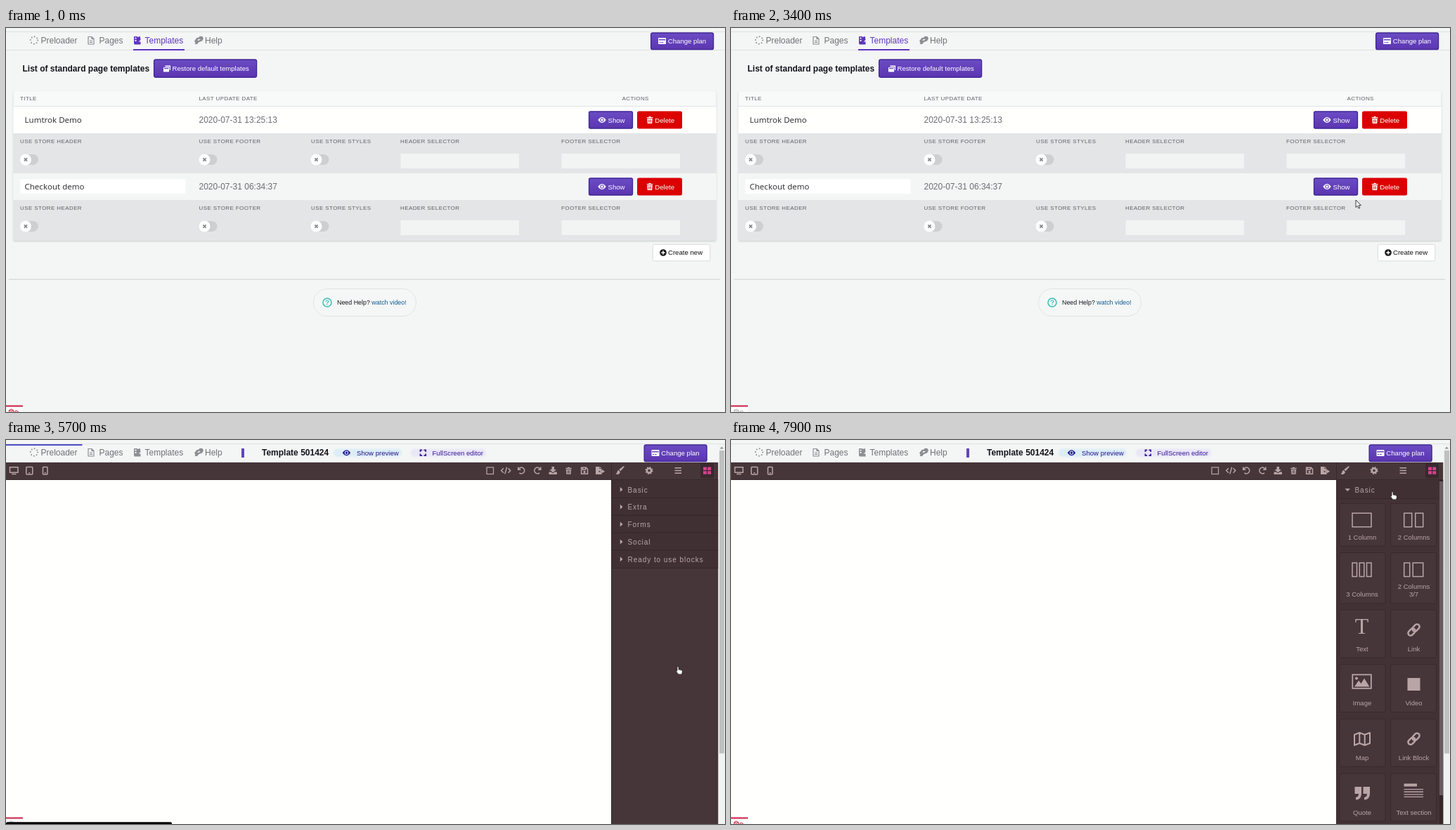
Write an HTML page that moves like this. It is 1023 by 547 pixels and loops after 8000 ms.

```html
<!DOCTYPE html>
<html lang="en">
<head>
<meta charset="utf-8">
<title>Template editor</title>
<style>
html, body { margin: 0; width: 100%; height: 100%; overflow: hidden; background: #f4f6f5; }
svg { display: block; width: 1023px; height: 547px; font: 12px "Liberation Sans", Arial, sans-serif; }
.nav { fill: #6f7276; }
.bold { font-weight: bold; fill: #15131c; }
.btn { font-size: 9.6px; }
.caps { font-size: 8px; letter-spacing: .4px; fill: #5f6367; }
.name { font: 11.5px "Noto Sans", sans-serif; fill: #35363a; }
.date { fill: #6b6e73; }
.help { font-size: 8.9px; fill: #16161c; }
.cat { font-size: 10px; letter-spacing: .95px; fill: #b9a5a6; }
.blk { font-size: 9.5px; fill: #b9a5a6; text-anchor: middle; }
.line { fill: none; stroke: currentColor; }
.ink { color: #b9a5a6; fill: currentColor; }
.cell { fill: #463539; stroke: #38292d; }
.btnbox { fill: url(#violet); stroke: #3f2596; stroke-width: 1.3; }

.list, .editor, .open, .thumb, .hover, .focus, .cursor, .hand, .arrow, .status, .load, .badge, .plan {
  animation: 8s step-end infinite;
}
.list { animation-name: list; }
.editor { animation-name: editor; }
.open { animation-name: open; }
.thumb { animation-name: thumb; }
.h1 { animation-name: hoverDelete; }
.h2 { animation-name: hoverShow; }
.focus { animation-name: focus; }
.plan { animation-name: plan; }
.status { animation-name: status; }
.load { animation-name: load; }
.badge { animation-name: badge; }
.cursor { animation-name: move; }
.hand { animation-name: hand; }
.arrow { animation-name: arrow; }

@keyframes list { 0% { opacity: 1 } 71.25%, to { opacity: 0 } }
@keyframes editor { 0% { opacity: 0 } 71.25%, to { opacity: 1 } }
@keyframes open { 0% { opacity: 0 } 97.5%, to { opacity: 1 } }
@keyframes thumb { 0% { opacity: 0 } 98.75%, to { opacity: 1 } }
@keyframes hoverDelete { 0%, 22.5%, to { opacity: 0 } 21.25% { opacity: .14 } }
@keyframes hoverShow { 0%, 42.5%, to { opacity: 0 } 25% { opacity: .12 } }
@keyframes focus { 0% { stroke: #d9dbdb; stroke-width: 1px } 48.75%, to { stroke: #111; stroke-width: 1.8px } }
@keyframes plan { 0% { transform: none } 71.25%, to { transform: translateX(-9.5px) } }
@keyframes status {
  0%, 42.5%, 76.25%, to { width: 212px; opacity: 0 }
  25% { width: 212px; opacity: .5 }
  28.75% { width: 212px; opacity: 1 }
  47.5% { width: 229px; opacity: 1 }
  68.75% { width: 236px; opacity: 1 }
}
@keyframes load {
  0%, 75%, to { width: 0 }
  57.5% { width: 101px }
  60% { width: 102.6px; animation-timing-function: steps(4) }
  65% { width: 109px }
  70% { width: 110px }
  71.25% { width: 108.5px }
}
@keyframes badge { 0%, 83.75%, to { stroke: #c8304c } 25% { stroke: #b5b5b5 } }
@keyframes move {
  0% { transform: translate(912px, 26px); opacity: 0 }
  18.75% { transform: translate(912px, 26px); opacity: 1 }
  20% { transform: translate(916px, 72px) }
  21.25% { transform: translate(914px, 128px) }
  22.5% { transform: translate(903px, 178px) }
  23.75% { transform: translate(888px, 211px) }
  25% { transform: translate(878.5px, 227.5px) }
  41.25% { transform: translate(880px, 230px) }
  42.5% { transform: translate(889px, 245px) }
  43.75% { transform: translate(907px, 269px) }
  45% { transform: translate(930px, 295px) }
  46.25% { transform: translate(947px, 313px) }
  47.5%, 71.25% { transform: translate(956px, 322.5px) }
  75% { transform: translate(955px, 312px) }
  76.25% { transform: translate(953px, 270px) }
  77.5% { transform: translate(950px, 210px) }
  78.75% { transform: translate(949px, 155px) }
  80% { transform: translate(950px, 115px) }
  81.25% { transform: translate(953px, 92px) }
  83.75% { transform: translate(980.5px, 58.5px) }
  85% { transform: translate(982px, 54px) }
  86.25% { transform: translate(980px, 56px) }
  87.5% { transform: translate(973px, 60px) }
  88.75% { transform: translate(964px, 64px) }
  90% { transform: translate(955px, 68px) }
  91.25% { transform: translate(947px, 71px) }
  92.5% { transform: translate(943px, 73px) }
  93.75%, to { transform: translate(941px, 73.5px); opacity: 1 }
}
@keyframes hand { 0%, 22.5%, 42.5%, 75% { opacity: 0 } 21.25%, 25%, 46.25%, 78.75%, to { opacity: 1 } }
@keyframes arrow { 0%, 22.5%, 42.5%, 75% { opacity: 1 } 21.25%, 25%, 46.25%, 78.75%, to { opacity: 0 } }
</style>
</head>
<body>
<svg viewBox="0 0 1023 547">
<defs>
  <linearGradient id="violet" x2="0" y2="1"><stop stop-color="#6b4cc3"/><stop offset="1" stop-color="#5b35b1"/></linearGradient>
  <filter id="soft" x="-10%" y="-30%" width="120%" height="160%"><feGaussianBlur stdDeviation="1"/></filter>

  <path id="eye" fill-rule="evenodd" d="M-5.7 0Q0-8 5.7 0Q0 8-5.7 0zM-2.7 0a2.7 2.7 0 1 0 5.4 0a2.7 2.7 0 1 0-5.4 0zM-1.7 0a1.7 1.7 0 1 0 3.4 0a1.7 1.7 0 1 0-3.4 0z"/>
  <path id="trash" fill-rule="evenodd" d="M-4.3-4h2.6l.6-1h2.2l.6 1h2.6v1.3h-8.6zM-3.7-2h7.4l-.5 7h-6.4zM-1.9-.8v4.6h.7v-4.6zM-.35-.8v4.6h.7v-4.6zM1.2-.8v4.6h.7v-4.6z"/>
  <path id="card" fill-rule="evenodd" d="M-5.5-3.6q0-.9.9-.9h9.2q.9 0 .9.9v7.2q0 .9-.9.9h-9.2q-.9 0-.9-.9zM-4.7-2.5v1.6h9.4v-1.6zM-4 1.6v1h2v-1zM-1.2 1.6v1h3v-1z"/>
  <path id="windows" fill-rule="evenodd" d="M-2.5-4.5h7.5v6.5h-1.2v-4.8h-6.3zM-5-2h8v6.5h-8zM-4-1v1.3h6v-1.3z"/>
  <g id="spinner"><circle r="5.2" fill="none" stroke="currentColor" stroke-width="2" stroke-linecap="round" stroke-dasharray="0 4.084"/></g>
  <path id="page" class="line" stroke-width="1.2" d="M-4-5h5l3 3v7.5h-8zM1-5v3h3M-2 .5h4M-2 2.8h4"/>
  <path id="swatch" d="M-5-5.5h5v1l3.8-1l.7 5l-3 2.500h3v4h-8q-1.500 0-1.500-2zM-3.500-4v2h2v-2zM-3.500-.5v2h2v-2z" fill-rule="evenodd"/>
  <path id="hands" d="M-6.500 1l3.500-4.500l3-.5l1-1.800l4 .3l1.500 3l-2 3.500l-4.500 1.500l-2.500 3h-3.500l1-2zM-2.500 0l2-1.800l3 .4l-3 1.800z" fill-rule="evenodd"/>
  <path id="undo" class="line" stroke-width="1.5" d="M-4.300-1.500A4.400 4.400 0 1 1-3 3.400M-4.800-5v3.700h3.800"/>
  <g id="link" class="line" stroke-width="2.600" transform="rotate(-45)"><rect x="-10.500" y="-3.700" width="12" height="7.400" rx="3.700"/><rect x="-1.500" y="-3.700" width="12" height="7.400" rx="3.700"/></g>
  <path id="mark" d="M0 0h9.500v9.500q0 9-8 9v-3.500q4-.5 4-5h-5.500z"/>

  <g id="toggle">
    <rect x="1" y="-7.500" width="25" height="15" rx="7.500" fill="#cdcfd1"/>
    <circle cx="8" r="8" fill="#fdfefe"/>
    <path d="M5.900-2.100l4.200 4.200M10.100-2.100l-4.200 4.200" stroke="#85888b" stroke-width="1.700"/>
  </g>
  <g id="options">
    <rect x="10.500" y="150" width="1000" height="57" fill="#e3e5e6"/>
    <g class="caps">
      <text x="20" y="163.800">USE STORE HEADER</text>
      <text x="274.500" y="163.800">USE STORE FOOTER</text>
      <text x="434" y="163.800">USE STORE STYLES</text>
      <text x="561" y="163.800">HEADER SELECTOR</text>
      <text x="790" y="163.800">FOOTER SELECTOR</text>
    </g>
    <use href="#toggle" x="20" y="187.500"/><use href="#toggle" x="274.500" y="187.500"/><use href="#toggle" x="433.500" y="187.500"/>
    <path fill="#f2f4f4" d="M561.500 179h168.500v21h-168.500zM790.500 179h168.500v21h-168.500z"/>
  </g>
  <g id="actions" class="btn" fill="#fff">
    <rect class="btnbox" x="829.500" y="119" width="62" height="24" rx="2"/>
    <use href="#eye" x="848" y="131"/><text x="856.500" y="134.500">Show</text>
    <rect x="898" y="118.500" width="64" height="25" rx="2.500" fill="#dc0000"/>
    <use href="#trash" x="916" y="131"/><text x="923.300" y="134.500">Delete</text>
  </g>
</defs>

<rect width="1023" height="547" fill="#f4f6f5"/>
<path stroke="#dfe1e1" d="M0 5.500h1023M0 31.500h1023"/>

<g class="nav" color="#8b8e92">
  <use href="#spinner" x="40" y="17.500"/><text x="49.500" y="22">Preloader</text>
  <use href="#page" x="121" y="17.500"/><text x="132.500" y="22">Pages</text>
  <use href="#hands" x="274.500" y="17.500" fill="#8b8e92"/><text x="283" y="22">Help</text>
</g>

<g class="list">
  <g fill="#5f35bf">
    <use href="#swatch" x="187" y="17.500"/><text x="197.500" y="22">Templates</text>
    <rect x="181" y="30" width="73" height="2"/>
  </g>
  <text class="bold" x="23.500" y="61.500">List of standard page templates</text>
  <rect class="btnbox" x="210.600" y="45" width="146" height="25.300" rx="2.500"/>
  <g class="btn" fill="#fff"><use href="#windows" x="229" y="58"/><text x="236.500" y="61.300">Restore default templates</text></g>

  <rect x="10.500" y="91" width="1000" height="213" rx="3" fill="#c9cccd" filter="url(#soft)"/>
  <rect x="10.500" y="90" width="1000" height="212.500" rx="3" fill="#f8f9f9"/>
  <rect x="10.500" y="111.500" width="1000" height="38.500" fill="#fffffe"/>
  <path d="M10.500 111.500h1000" stroke="#e1e3e3"/>
  <rect x="10.500" y="207" width="1000" height="38" fill="#f4f6f6"/>
  <rect x="20.500" y="215.500" width="235" height="20.500" fill="#fff"/>
  <g class="caps">
    <text x="20" y="103.300">TITLE</text>
    <text x="274.500" y="103.300">LAST UPDATE DATE</text>
    <text x="876.500" y="103.300">ACTIONS</text>
  </g>
  <use href="#options"/><use href="#options" y="95"/>
  <g class="name"><text x="26.500" y="135">Lumtrok Demo</text><text x="26.500" y="230">Checkout demo</text></g>
  <g class="date"><text x="274.500" y="134.500">2020-07-31 13:25:13</text><text x="274.500" y="229.500">2020-07-31 06:34:37</text></g>
  <use href="#actions"/><use href="#actions" y="95"/>
  <rect class="hover h1" x="898" y="118.500" width="64" height="25" rx="2.500"/>
  <rect class="hover h2" x="829" y="213.500" width="63" height="25" rx="2.500"/>

  <rect class="focus" x="920.300" y="308.300" width="81.500" height="23.500" rx="2" fill="#fff"/>
  <circle cx="935" cy="320" r="4.800" fill="#111"/>
  <path d="M932.200 320h5.600M935 317.200v5.600" stroke="#fff" stroke-width="1.500"/>
  <text class="btn" x="942" y="323.300" fill="#111">Create new</text>

  <path d="M4 358.200h1012" stroke="#d3d6d6" stroke-width="1.200"/>
  <rect x="437.500" y="371.500" width="146" height="39" rx="19.500" fill="#f5f7f6" stroke="#e0e3e3"/>
  <circle cx="457" cy="391" r="6" fill="none" stroke="#35bdb5" stroke-width="1.500"/>
  <path d="M455.100 389.700q.1-1.700 1.900-1.700t1.900 1.500q0 1-1.900 2.200v.6M457 393.200v1.200" fill="none" stroke="#35bdb5" stroke-width="1.200"/>
  <text class="help" x="471" y="394.200">Need Help? <tspan fill="#0f5a94">watch video!</tspan></text>
</g>

<g class="editor">
  <g class="nav"><use href="#swatch" x="187" y="17.500" fill="#8b8e92"/><text x="197.500" y="22">Templates</text></g>
  <rect x="335" y="12" width="4" height="13" fill="#6244bd"/>
  <text class="bold" x="364" y="22">Template 501424</text>
  <g filter="url(#soft)"><rect x="466" y="12.500" width="97" height="11.500" rx="5.500" fill="#dcedf7"/><rect x="576" y="12.500" width="107" height="11.500" rx="5.500" fill="#e9e7f8"/></g>
  <g class="btn" fill="#23158a">
    <use href="#eye" x="484.500" y="18.300"/><text x="499" y="21.700">Show preview</text>
    <path class="line" color="#3a1796" stroke-width="1.700" d="M589.500 17v-2.700h2.700M594.500 14.300h2.700v2.700M597.200 19.500v2.700h-2.700M592.200 22.200h-2.700v-2.700"/>
    <text x="606.500" y="21.700" fill="#3a1796">FullScreen editor</text>
  </g>

  <rect y="57" width="861" height="490" fill="#fffffe"/>
  <path fill="#463539" d="M0 32h1013.500v515h-152.500v-490h-861z"/>
  <path stroke="#38292d" d="M0 56.500h1013.500M861.500 32v515"/>
  <rect x="988" y="33" width="19" height="21.500" rx="2" fill="#38292d"/>
  <g class="ink">
    <g class="line" stroke-width="1.500">
      <path d="M5.500 38.700h11.500v7.500h-11.500zM8 48.500h6.500"/>
      <rect x="28.800" y="38.500" width="9" height="10.500" rx="1"/><path d="M32.300 46.800h2"/>
      <rect x="52.500" y="38.500" width="6.500" height="10.500" rx="1"/><path d="M54.800 46.800h2"/>
      <rect x="684" y="39" width="9.500" height="9.500" stroke-width="1.200"/>
      <path d="M708-3"/>
      <path d="M707.800 40.300l-3.100 3.200l3.100 3.200M714.600 40.300l3.100 3.200l-3.100 3.200M712.600 38.800l-2.800 9.600"/>
      <path d="M818.600 39.300h6.700l2.200 2.200v6.800h-8.900zM820.500 39.500v2.800h4v-2.800"/>
      <circle cx="823" cy="45.500" r=".9"/>
      <path d="M951.500 39.700h9.500M951.500 43.500h9.500M951.500 47.300h9.500" stroke-width="1.600"/>
      <circle cx="915" cy="43.500" r="3.100" stroke-width="2.500"/>
      <circle cx="915" cy="43.500" r="4.700" stroke-width="1.700" stroke-dasharray="1.900 1.791"/>
    </g>
    <use href="#undo" x="733.500" y="43.500"/>
    <use href="#undo" transform="translate(756 43.500) scale(-1 1)"/>
    <path d="M776.500 38h3.500v4h3l-4.800 4.500l-4.700-4.500h3zM772.500 45.500h3l2.700 2l2.700-2h3v3.500h-11.400z"/>
    <use href="#trash" x="800.500" y="43.800"/>
    <path d="M839 38h5.500v3h3v3h-4v1.500h4v3.500h-8.500zM845.300 38l2.200 2.300h-2.200zM848 42l4 2.800l-4 2.800v-2h-2.500v-1.500h2.500z"/>
    <path d="M879.800 38.300l-5.300 6l-2.400-2l6-4.900q1.500-.5 1.700.9zM871.300 43l2.500 2.200q-.3 3.800-4 3.800q-1.500 0-2.300-1.300q2 0 2-2q.1-2 1.800-2.700z"/>
  </g>
  <path fill="#d6408f" d="M992 38.500h5v4.500h-5zM998.200 38.500h5v4.500h-5zM992 44.200h5v4.500h-5zM998.200 44.200h5v4.500h-5z"/>

  <rect x="862" y="57" width="151.500" height="125.500" fill="#403034"/>
  <path stroke="#35272a" d="M862 82.500h151.500M862 107.300h151.500M862 132h151.500M862 157h151.500M862 182.500h151.500"/>
  <path class="ink" d="M873.800 67l3.700 3.500l-3.700 3.500zM873.800 91.800l3.700 3.500l-3.700 3.500zM873.800 116.600l3.700 3.500l-3.700 3.500zM873.800 141.400l3.700 3.500l-3.700 3.500zM873.800 166.200l3.700 3.500l-3.700 3.500z"/>
  <g class="cat">
    <text x="884.500" y="74.500">Basic</text><text x="884.500" y="99.300">Extra</text><text x="884.500" y="124.100">Forms</text>
    <text x="884.500" y="148.900">Social</text><text x="884.500" y="173.700">Ready to use blocks</text>
  </g>

  <g class="open">
    <rect x="862" y="57" width="151.500" height="490" fill="#423236"/>
    <rect x="862" y="57" width="146" height="26.500" fill="#403034"/>
    <path d="M862 83.500h146" stroke="#38292d"/>
    <path class="ink" d="M873.500 69.300h7.500l-3.750 3.700z"/>
    <text class="cat" x="887.500" y="74.500">Basic</text>
    <g class="cell">
      <rect x="866" y="90.500" width="65" height="60.500" rx="2"/><rect x="938.500" y="90.500" width="65" height="60.500" rx="2"/>
      <rect x="866" y="160.500" width="65" height="72.500" rx="2"/><rect x="938.500" y="160.500" width="65" height="72.500" rx="2"/>
      <rect x="866" y="242" width="65" height="68" rx="2"/><rect x="938.500" y="242" width="65" height="68" rx="2"/>
      <rect x="866" y="319.700" width="65" height="68" rx="2"/><rect x="938.500" y="319.700" width="65" height="68" rx="2"/>
      <rect x="866" y="397.400" width="65" height="68" rx="2"/><rect x="938.500" y="397.400" width="65" height="68" rx="2"/>
      <rect x="866" y="475.100" width="65" height="68" rx="2"/><rect x="938.500" y="475.100" width="65" height="68" rx="2"/>
    </g>
    <g class="ink">
      <path class="line" stroke-width="1.500" d="M884 104.300h27v19.500h-27zM957.700 104.300h11v19.500h-11zM973.700 104.300h11v19.500h-11zM884 175h6.500v19.500h-6.500zM894.300 175h6.500v19.500h-6.500zM904.500 175h6.500v19.500h-6.500zM957.700 175h8v19.500h-8zM970.200 175h14.500v19.500h-14.500z"/>
      <text x="887.700" y="275.500" style="font:32px 'Liberation Serif',serif">T</text>
      <use href="#link" x="0" y="0" transform="translate(971.500 270.500) scale(.95)"/>
      <use href="#link" transform="translate(971.500 425.800) scale(.95)"/>
      <rect class="line" x="884.300" y="334.300" width="26.500" height="19.500" stroke-width="1.800"/>
      <path d="M887 351.500l6-9l3.500 4.500l4.500-7.500l7.500 12z"/><circle cx="890" cy="339.500" r="2"/>
      <rect x="962.500" y="339" width="18" height="18"/>
      <path class="line" stroke-width="2" stroke-linejoin="round" d="M887 419.800l7.300-2.800l7.400 2.800l7.300-2.800v15l-7.300 2.800l-7.400-2.800l-7.300 2.800zM894.300 417v15M901.700 419.800v15"/>
      <use href="#mark" x="887.500" y="494"/><use href="#mark" x="899.500" y="494"/>
      <path d="M957.500 489.500h18.500v4h-18.500zM957.500 497h27.500v1.300h-27.500zM957.500 500.600h27.500v1.300h-27.500zM957.500 504.200h27.500v1.300h-27.500zM957.500 507.800h27.500v1.300h-27.500z"/>
    </g>
    <g class="blk">
      <text x="898" y="141.500">1 Column</text><text x="971.500" y="141.500">2 Columns</text>
      <text x="898" y="222.800">3 Columns</text><text x="971.500" y="212">2 Columns</text><text x="971.500" y="222.800">3/7</text>
      <text x="898" y="300.500">Text</text><text x="971.500" y="300.500">Link</text>
      <text x="898" y="378.200">Image</text><text x="971.500" y="378.200">Video</text>
      <text x="898" y="455.900">Map</text><text x="971.500" y="455.900">Link Block</text>
      <text x="898" y="533.600">Quote</text><text x="971.500" y="533.600">Text section</text>
    </g>
    <rect x="1008" y="57" width="5.500" height="490" fill="#34272a"/>
    <rect class="thumb" x="1008" y="59" width="5.500" height="447" fill="#675c5f"/>
  </g>

  <rect x="1013.500" y="6" width="9.500" height="541" fill="#f1f2f2"/>
  <rect x="1015" y="15" width="7" height="431.500" fill="#bfc1c1"/>
  <path d="M1015.800 12.500l2.500-3l2.500 3z" fill="#8a8c8c"/>
</g>

<g class="plan">
  <rect class="btnbox" x="917.600" y="7" width="89" height="23.700" rx="2.500"/>
  <g class="btn" fill="#fff"><use href="#card" x="933.500" y="18.500"/><text x="941.800" y="21.800">Change plan</text></g>
</g>
<rect class="load" y="6" height="2" fill="#4f4fc8"/>

<rect y="538" width="24" height="9" fill="#fbfbfb"/>
<rect y="537.500" width="24" height="2" fill="#cc1f45"/>
<g class="badge" fill="none" stroke-width="1.100">
  <path d="M4.500 547v-2.500l3-1.500l3 1.500v2.500M4.500 544.500l3 1.500l3-1.500M12 547q2.500-3.500 5.500 0"/>
</g>
<rect class="status" y="544.300" height="6" rx="2"/>

<g class="cursor" stroke="#111" stroke-width=".8" fill="#fff" stroke-linejoin="round">
  <path class="hand" d="M-1.100 1.100a1.100 1.100 0 0 1 2.200 0v3.300l4 .8q1.600.4 1.400 2l-.8 4.100h-5l-3.300-4q-.7-1.100.3-1.400l1.200.7z"/>
  <path class="arrow" d="M0 0v10.500l2.400-2.200l1.600 3.700l1.700-.7l-1.600-3.600h3.300z"/>
</g>
</svg>
</body>
</html>
```
